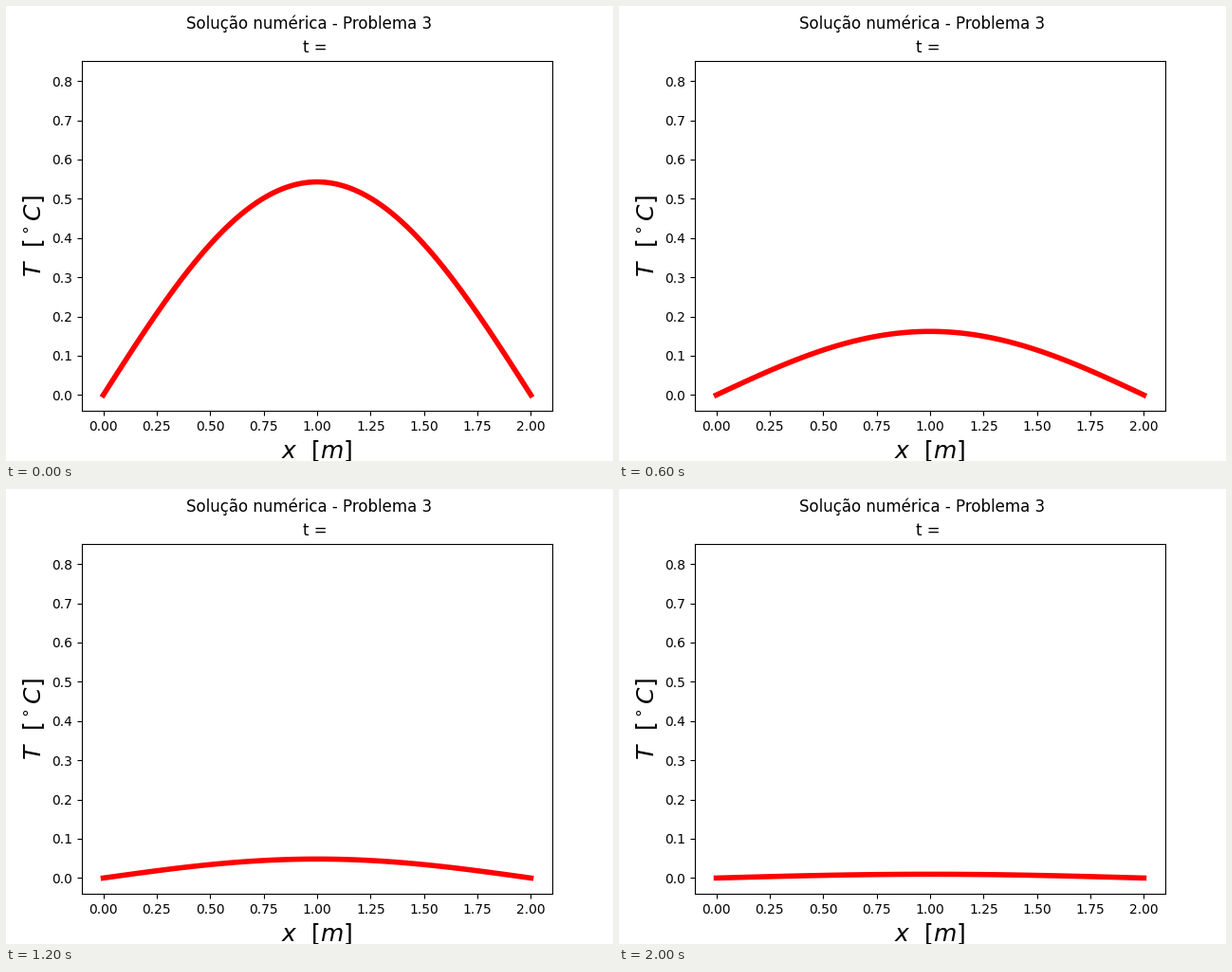
Write a matplotlib script that moves like this. It is 640 px wide and 480 px high and loops after 2.1 s.

```python
import numpy as np
import matplotlib.pyplot as plt
from matplotlib.animation import FuncAnimation

FRAMES = 21
INTERVAL = 100
LENGTH = 2.0
START_PEAK = 0.543
DECAY = 0.2015      # decay of the first mode per frame
SCALE_PEAK = 0.8115  # peak that sets the vertical range
MARGIN = 0.05

x = np.linspace(0, LENGTH, 101)
mode = np.sin(np.pi * x / LENGTH)


def padded(top):
    return -MARGIN * top, (1 + MARGIN) * top


fig, ax = plt.subplots(figsize=(6.4, 4.8), dpi=100)
fig.suptitle("Solução numérica - Problema 3")
ax.set_title("t = ")
ax.set_xlabel(r"$x \ \ [m]$", fontsize=18)
ax.set_ylabel(r"$T \ \ [^\circ C]$", fontsize=18)
ax.set_xlim(*padded(LENGTH))
ax.set_ylim(*padded(SCALE_PEAK))
line, = ax.plot(x, START_PEAK * mode, color="red", linewidth=4)


def update(i):
    line.set_ydata(START_PEAK * np.exp(-DECAY * i) * mode)
    return line,


anim = FuncAnimation(fig, update, frames=FRAMES, interval=INTERVAL,
                     repeat=True, repeat_delay=0)
plt.show()
```
